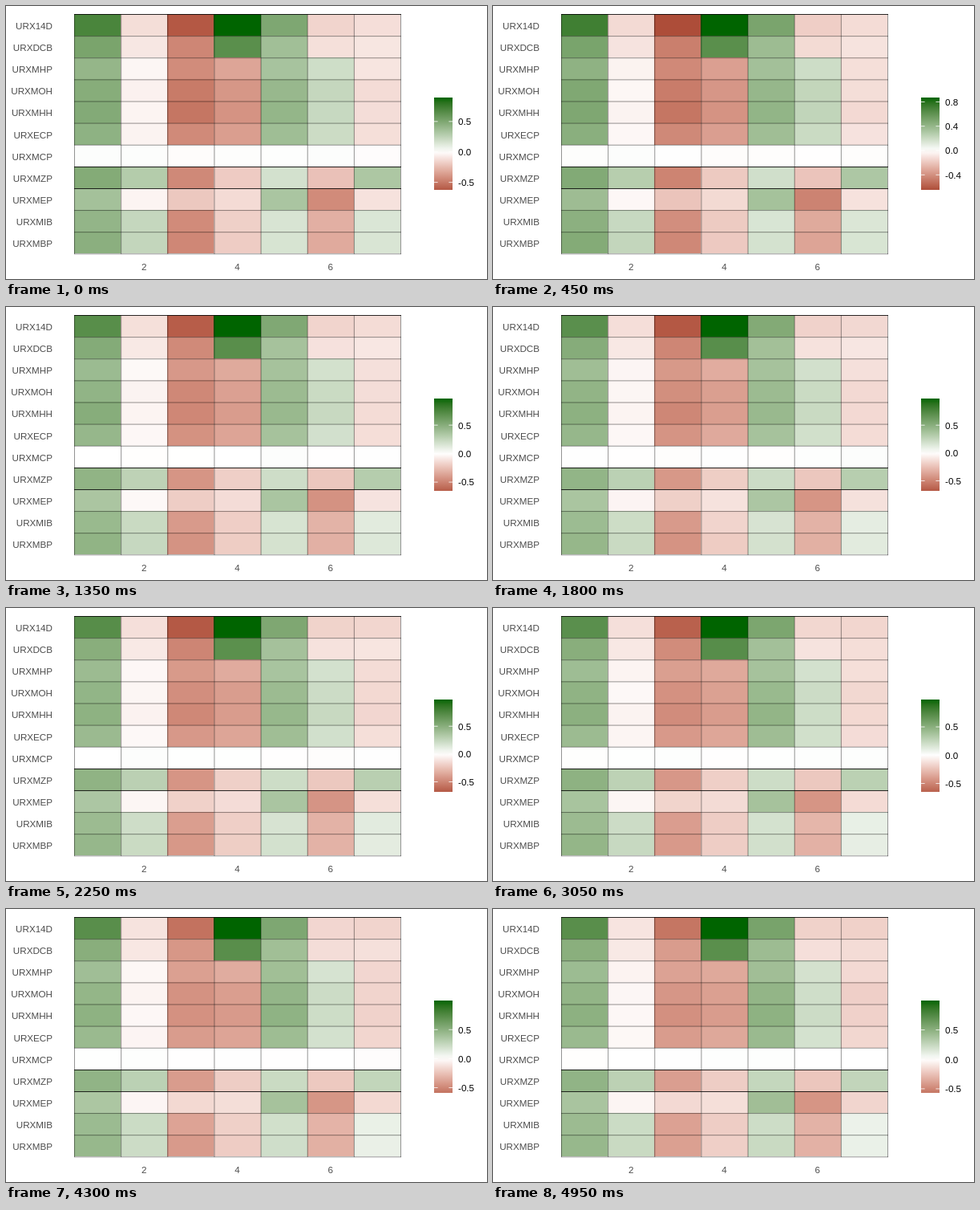
These frames come from a looping animation (600 px wide and 340 px high, 5 s). An HTML page:

```html
<!DOCTYPE html>
<html lang="en">
<head>
<meta charset="utf-8">
<title>Loadings heatmap</title>
<style>
  html, body { margin: 0; width: 100%; height: 100%; overflow: hidden; background: #fff; }
  svg { display: block; width: 600px; height: 340px; }
  text { font: 11.65px "Liberation Sans", Arial, sans-serif; fill: #4d4d4d; }
  .end { text-anchor: end; }
  .mid { text-anchor: middle; }
  .key { fill: #000; }
</style>
</head>
<body>
<svg id="plot" viewBox="0 0 600 340">
  <defs><linearGradient id="ramp" x1="0" y1="0" x2="0" y2="1"></linearGradient></defs>
</svg>
<script>
const STEP = 50, STEPS = 100, JITTER = 1.2;
const LEFT = 85, TOP = 10, CELL_W = 58.14, CELL_H = 27.12;
const BAR = { x: 534, y: 114, w: 23, h: 115 };

// Each family shares one profile of loadings (in percent), scaled per row
const families = [
  { profile: [71, -12, -64, 97, 54, -17, -16], rows: { URX14D: 1, URXDCB: .72 } },
  { profile: [47, -4, -46, -39, 43, 21, -15],
    rows: { URXMHP: .88, URXMOH: 1, URXMHH: 1.04, URXECP: .92, URXMCP: 0 } },
  { profile: [47, 28, -42, -20, 21, -22, 29], rows: { URXMZP: 1 } },
  { profile: [36, -3, -18, -13, 37, -44, -13], rows: { URXMEP: 1 } },
  { profile: [44, 22, -41, -19, 18, -31, 11], rows: { URXMIB: .97, URXMBP: 1.03 } }
];
const rows = families.flatMap(({ profile, rows }) =>
  Object.entries(rows).map(([name, weight]) => ({ name, weight, profile })));

// Slow change of each column over the whole loop
const drift = [0, 0, 4, -2, 7, -1, -7];

// Path of the two extreme loadings: step, lowest, highest
const extremes = [
  [0, -60, 88.5], [17, -65.7, 85], [27, -64, 96.5], [45, -69, 98],
  [61, -66, 99.5], [73, -60, 99], [99, -60, 100.5]
];

const plot = document.getElementById('plot');
const ramp = document.getElementById('ramp');

function add(parent, tag, attrs, content = '') {
  const el = document.createElementNS('http://www.w3.org/2000/svg', tag);
  for (const name in attrs) el.setAttribute(name, attrs[name]);
  el.textContent = content;
  parent.appendChild(el);
  return el;
}

const box = (x, y, width, height, fill, opacity = 1) =>
  add(plot, 'rect', { x, y, width, height, fill, 'fill-opacity': opacity });

// White to dark green or dark red, blended in CIELAB
function color(v) {
  const k = Math.min(1, Math.abs(v));
  const [l, a, b] = v < 0 ? [26, 51, 41.3] : [36.2, -43.4, 41.9];
  const fy = (100 + (l - 100) * k + 16) / 116;
  const cube = f => f > 6 / 29 ? f ** 3 : (f - 4 / 29) * 108 / 841;
  const X = .9505 * cube(fy + a * k / 500), Y = cube(fy), Z = 1.089 * cube(fy - b * k / 200);
  const gamma = c => {
    c = Math.min(1, Math.max(0, c));
    return Math.round(255 * (c <= .0031308 ? 12.92 * c : 1.055 * c ** (1 / 2.4) - .055));
  };
  return `rgb(${gamma(3.2406 * X - 1.5372 * Y - .4986 * Z)},` +
    `${gamma(-.9689 * X + 1.8758 * Y + .0415 * Z)},` +
    `${gamma(.0557 * X - .204 * Y + 1.057 * Z)})`;
}

// Repeatable noise from -1 to 1
function noise(a, b) {
  const s = Math.sin(a * 127.1 + b * 311.7) * 43758.5453;
  return (s - Math.floor(s)) * 2 - 1;
}

const colX = i => LEFT + CELL_W * i;
const rowY = i => TOP + CELL_H * i;
const span = (at, i) => [Math.round(at(i)), Math.round(at(i + 1)) - Math.round(at(i))];

const cells = rows.map(({ name, profile }, r) => {
  add(plot, 'text', { x: 58, y: rowY(r + .5) + 5.4, class: 'end' }, name);
  const [y, h] = span(rowY, r);
  return profile.map((_, c) => {
    const [x, w] = span(colX, c);
    return box(x, y, w, h, '#fff');
  });
});
for (let c = 0; c <= 7; c++) box(colX(c), TOP, 1, 299, '#000', .42);
for (let r = 0; r <= 11; r++) box(LEFT, rowY(r), 408, 1, '#000', .42);
for (const r of [0, 7, 8]) box(LEFT, Math.round(rowY(r)), 408, 1, '#000', .7);
for (const n of [2, 4, 6]) {
  add(plot, 'text', { x: colX(n - .5), y: 329, class: 'mid' }, n);
}

box(BAR.x, BAR.y, BAR.w, BAR.h, 'url(#ramp)');
const stops = Array.from({ length: 21 }, (_, i) => add(ramp, 'stop', { offset: i / 20 }));
const ticks = Array.from({ length: 4 }, () => ({
  mark: add(plot, 'path', { stroke: '#fff', 'stroke-width': .8 }),
  label: add(plot, 'text', { x: 564, class: 'key' })
}));

function drawKey(low, high) {
  const zero = BAR.y + BAR.h * high / (high - low);
  const unit = BAR.h / (high - low);
  const breaks = high < 87.5 ? [80, 40, 0, -40] : [50, 0, -50];
  stops.forEach((s, i) => s.setAttribute('stop-color', color(1 - i / 20 * (1 - low / high))));
  ticks.forEach(({ mark, label }, i) => {
    const shown = i < breaks.length;
    mark.style.display = label.style.display = shown ? '' : 'none';
    if (!shown) return;
    const y = zero - breaks[i] * unit;
    mark.setAttribute('d', `M${BAR.x} ${y}h4.6M${BAR.x + BAR.w} ${y}h-4.6`);
    label.setAttribute('y', y + 4.4);
    label.textContent = (breaks[i] / 100).toFixed(1);
  });
}

function extremesAt(step) {
  const next = Math.max(1, extremes.findIndex(([s]) => s >= step));
  const from = extremes[next - 1], to = extremes[next];
  const u = (step - from[0]) / (to[0] - from[0]);
  return [1, 2].map(i => from[i] + (to[i] - from[i]) * u);
}

function draw(step) {
  const shift = step / (STEPS - 1) - .5;
  [families[0].profile[2], families[0].profile[3]] = extremesAt(step);
  const values = rows.map(({ profile, weight }, r) => profile.map((v, c) =>
    weight * (v + drift[c] * shift) + JITTER * noise(step + 1, r * 7 + c + 1)));

  // Colours are relative to the largest loading
  const [, , low, high] = values[0];
  values.forEach((line, r) => line.forEach((v, c) =>
    cells[r][c].setAttribute('fill', color(v / high))));
  drawKey(low, high);
}

let last = -1;
const start = performance.now();
function tick() {
  const step = Math.floor((performance.now() - start) / STEP) % STEPS;
  if (step !== last) draw(last = step);
  requestAnimationFrame(tick);
}
tick();
</script>
</body>
</html>
```
